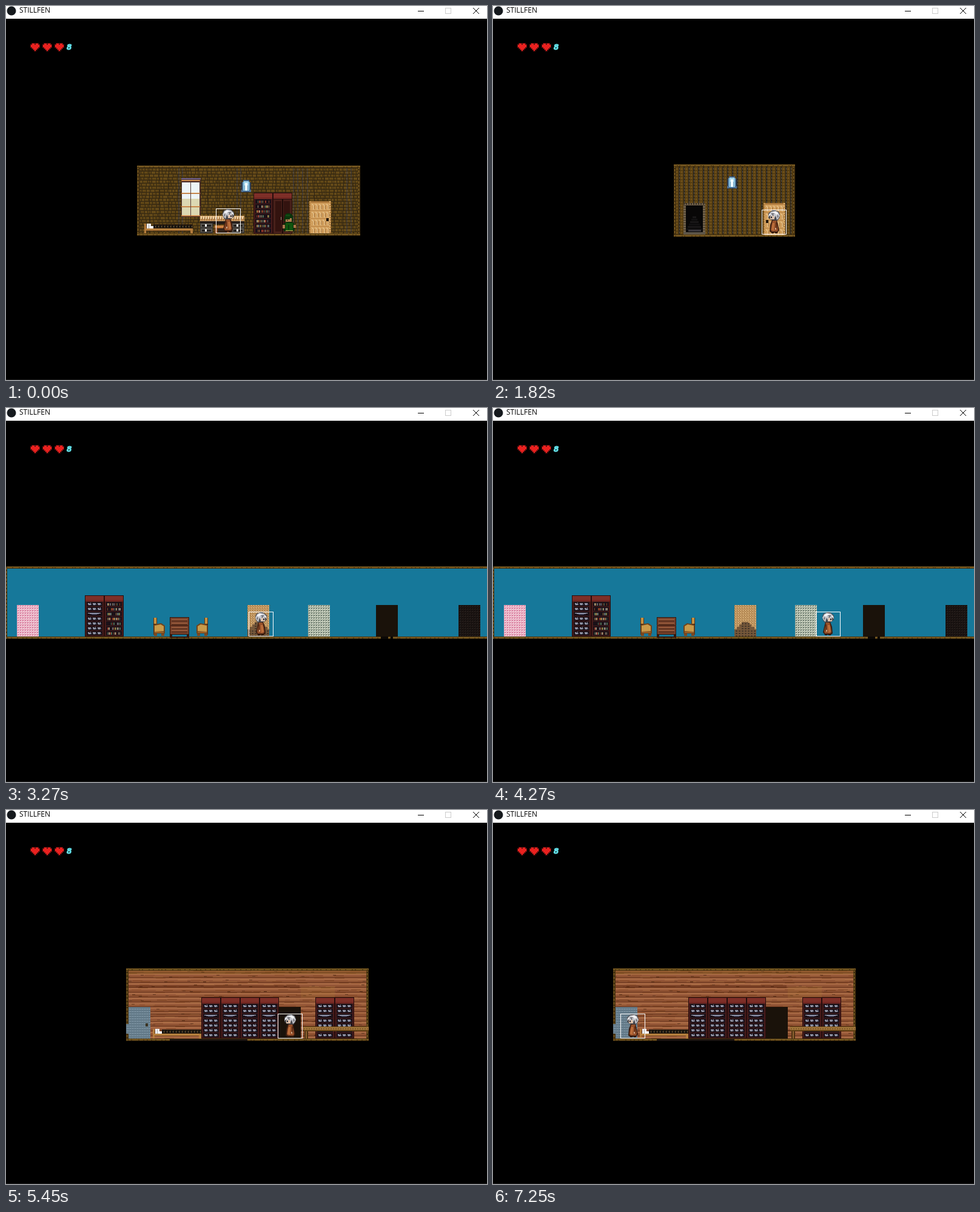
An HTML page with a canvas that plays this animation: 793x617 px, repeating every 8000 ms.

```html
<!DOCTYPE html>
<html lang="en">
<head>
<meta charset="utf-8">
<title>STILLFEN</title>
<style>
html, body { margin: 0; width: 100%; height: 100%; overflow: hidden; background: #000; }
canvas { position: absolute; left: 0; top: 0; }
span { position: absolute; line-height: 16px; white-space: pre; }
#name { left: 22px; top: -1px; font: 12px/16px "Open Sans", sans-serif; color: #000; }
#count { left: 100px; top: 60px; font: italic bold 12px/16px "DejaVu Sans", sans-serif; color: #62dfe8; -webkit-text-stroke: 1px #62dfe8; }
</style>
</head>
<body>
<canvas id="stage" width="793" height="617"></canvas>
<span id="name">STILLFEN</span><span id="count">8</span>
<script>
const W = 793, H = 617, LOOP = 8000;
const view = document.getElementById('stage').getContext('2d');
let g = view, seed = 7;

const rnd = () => (seed = (seed * 16807) % 2147483647) / 2147483647;
const pick = list => list[Math.floor(rnd() * list.length)];
const span = (from, to, step, fn) => { for (let v = from; v < to; v += step) fn(v); };
function box(color, x, y, w, h) { g.fillStyle = color; g.fillRect(x, y, w, h); }
function poly(color, ...p) {
  g.fillStyle = color;
  g.beginPath();
  for (let i = 0; i < p.length; i += 2) g.lineTo(p[i], p[i + 1]);
  g.fill();
}
function clip(x, y, w, h, fn) {
  g.save();
  g.beginPath();
  g.rect(x, y, w, h);
  g.clip();
  fn();
  g.restore();
}
function layer(fn) {
  const c = document.createElement('canvas');
  c.width = W; c.height = H;
  g = c.getContext('2d');
  fn();
  g = view;
  return c;
}

// walls and edges
function beam(x, y, w, h) {
  box('#4a3410', x, y, w, h);
  if (w > h) {
    box('#846528', x, y + 1, w, 1);
    box('#6f511d', x, y + 2, w, 1);
    span(x, x + w, 8, i => box('#3a290e', i + Math.floor(rnd() * 6), y + 2, 2, 1));
  } else {
    box('#846528', x + 1, y, 1, h);
    span(y, y + h, 6, i => box('#3a290e', x + 1, i, 2, 2));
  }
}
function edges(x, y, w, h) {
  beam(x, y, 4, h);
  beam(x + w - 4, y, 4, h);
  beam(x, y, w, 4);
  beam(x, y + h - 4, w, 4);
}
function brickWall(x, y, w, h) {
  clip(x, y, w, h, () => {
    box('#362912', x, y, w, h);
    span(y, y + h, 5, j => {
      let i = x - rnd() * 6;
      while (i < x + w) {
        const n = 5 + Math.floor(rnd() * 4);
        i = Math.floor(i);
        box(pick(['#594113', '#614717', '#533c13']), i, j, n - 1, 4);
        box('#6b4f1b', i, j + 1, n - 2, 1);
        i += n;
      }
    });
    span(x + 4, x + w, 16, i => box('rgba(34,28,22,.5)', i, y, 1, h));
    [284, 290, 380, 386, 473, 480, 488, 496, 561, 568].forEach(i =>
      span(y, y + h, 5, j => box('rgba(66,66,76,.6)', i, j, 2, 4)));
  });
}
function plankWall(x, y, w, h) {
  clip(x, y, w, h, () => {
    box('#5b4113', x, y, w, h);
    span(x, x + w, 8, i => {
      box('#6f501a', i + 4, y, 2, h);
      box('#2a2318', i, y, 2, h);
      span(y, y + h, 5, j => {
        box('#46340f', i + 2, j, 5, 1);
        box('#4c4a48', i + 1, j + 1, 1, 3);
      });
    });
  });
}
function woodWall(x, y, w, h) {
  clip(x, y, w, h, () => {
    box('#98593a', x, y, w, h);
    span(y, y + h, 8, j => {
      box('#a86a44', x, j + 1, w, 2);
      box('#864b2a', x, j + 5, w, 1);
      box('#623118', x, j + 7, w, 1);
      span(x, x + w, 20, i => {
        box(pick(['#7d4424', '#8a4c2a', '#aa6c42']), i + Math.floor(rnd() * 12), j + pick([0, 3, 4, 6]), 16, 1);
        if (rnd() < .4) box('#5f341c', i + Math.floor(rnd() * 14), j + pick([3, 5, 6]), 5, 1);
      });
    });
    box('rgba(80,30,10,.35)', x, 289, 286, 4);
    box('rgba(70,30,12,.3)', 230, 335, 92, 3);
    box('rgba(140,105,35,.3)', x, 265, w, 6);
    box('rgba(166,115,55,.25)', 486, 292, 56, 18);
  });
}

// furniture
function door(x, y, knob) {
  box('#a9763a', x, y, 36, 53);
  box('#d2a05e', x + 2, y + 2, 32, 51);
  span(y + 3, y + 50, 13, j => {
    box('#b98446', x + 2, j - 1, 32, 1);
    span(x + 4, x + 32, 6, i => {
      g.strokeStyle = '#f0d5a4';
      g.beginPath();
      g.moveTo(i, j + 2);
      g.quadraticCurveTo(i + 5, j + 3, i + 3, j + 11);
      g.stroke();
      box('#99652f', i + 4, j + 4, 1, 6);
    });
  });
  span(y, y + 52, 4, j => { box('#c4924f', x, j, 3, 2); box('#e0b878', x + 33, j, 2, 2); });
  box('#21160c', x + knob, y + 28, 4, 5);
}
function lamp(x, y) {
  box('#2b3a52', x, y + 4, 16, 15);
  box('#3f5f84', x + 3, y, 10, 20);
  box('#6ea3c6', x + 2, y + 3, 12, 15);
  box('#a5d6ec', x + 4, y + 2, 8, 16);
  box('#5f93b5', x + 5, y + 9, 1, 9);
  box('#5f93b5', x + 10, y + 9, 1, 9);
  box('#f2fcff', x + 6, y + 5, 4, 12);
  box('#4d6f94', x, y + 16, 3, 4);
  box('#4d6f94', x + 13, y + 16, 3, 4);
}
function bed(x, y) {
  box('#5e3418', x, y + 4, 80, 8);
  box('#30200f', x + 15, y + 1, 65, 7);
  span(x + 15, x + 78, 5, i => {
    box('#171410', i, y + 2, 3, 5);
    box('#71684c', i + 3, y + 4, 1, 2);
  });
  box('#b8823f', x, y + 8, 80, 3);
  box('#7c4d22', x, y + 11, 80, 1);
  box('#b47c3c', x, y, 3, 16);
  box('#b47c3c', x + 76, y + 8, 4, 8);
  box('#f0f0f0', x + 4, y, 7, 8);
  box('#fff', x + 10, y + 4, 5, 4);
  box('#a9a9a9', x + 7, y + 1, 1, 7);
}
function dishes(x, y, r) {
  if (r === 2) {
    box('#a9adc2', x + 1, y + 2, 21, 1);
    box('#70758f', x + 4, y + 3, 15, 1);
    box('#4c5068', x + 7, y + 4, 9, 1);
    return;
  }
  span(x, x + 23, 8, i => {
    const tall = (i - x + r * 8) % 24 === 0;
    box('#555a72', i + 1, y + 3, 6, 2);
    box('#b9bccb', i + 1, y + 2, tall ? 3 : 5, 1);
    box('#d2d3da', i + 2, y + 4, 3, 1);
    if (tall) box('#8f93a6', i + 5, y + 1, 1, 4);
  });
}
function cabinet(x, y, kind) {
  box('#260d0d', x, y, 32, 68);
  box('#7e2f28', x + 1, y + 1, 30, 9);
  box('#6b211d', x + 1, y + 8, 30, 1);
  if (kind === 'plain') {
    box('#48201a', x + 1, y + 11, 30, 56);
    box('#33130f', x + 4, y + 14, 10, 50);
    box('#33130f', x + 18, y + 14, 10, 50);
    box('#1c0a08', x + 15, y + 11, 2, 56);
    box('#8b8478', x + 13, y + 40, 1, 5);
    return;
  }
  box('#471b1a', x + 1, y + 10, 30, 57);
  span(0, 7, 1, r => {
    const j = y + 11 + r * 8;
    box('#1b1118', x + 3, j, 26, 7);
    if (kind === 'dishes') return dishes(x + 4, j, r);
    span(x + 5, x + 27, 2, i => {
      if (rnd() < .78) box(pick(['#8d3527', '#94743a', '#4e6b52', '#66646c', '#7c4428', '#988c74']), i, j + 2, 1 + Math.floor(rnd() * 2), 4);
    });
  });
}
function darkDoor(x, y) { box('#1a120a', x, y, 36, 52); }
function tiles(x, y, base, a, b) {
  box(base, x, y, 36, 52);
  span(y, y + 52, 4, j => span(x, x + 36, 4, i => {
    box(a, i + 1, j + 1, 2, 1);
    box(b, i + 2, j + 2, 2, 1);
  }));
}
function windowPane() {
  box('#4a2f2c', 289, 284, 32, 64);
  box('#6a5d8c', 289, 284, 32, 2);
  box('#edf4f6', 290, 291, 29, 27);
  box('#dcd8b2', 290, 318, 29, 28);
  [287, 308, 330, 345].forEach(y => { box('#b06a34', 289, y, 31, 2); box('#e0a868', 290, y, 29, 1); });
  box('#59403c', 304, 290, 1, 56);
}
function desk() {
  box('#241c18', 320, 355, 73, 5);
  box('#d0a36b', 320, 346, 73, 9);
  span(321, 392, 4, i => { box('#f0d7ae', i, 347, 2, 4); box('#8f6336', i + 2, 349, 1, 5); box('#b9824a', i, 352, 2, 2); });
  [320, 372].forEach(x => {
    box('#373431', x, 358, 21, 17);
    [359, 367].forEach(y => { box('#5c5852', x + 1, y, 19, 6); box('#201d1b', x + 3, y + 2, 15, 3); box('#f2f2f2', x + 8, y + 1, 3, 4); });
  });
  box('#8a4a20', 344, 362, 25, 13);
  box('#cd8142', 344, 362, 25, 4);
  box('#33241a', 349, 367, 15, 8);
}
function chair(x, flip) {
  g.save();
  g.translate(x + (flip ? 22 : 0), 345);
  if (flip) g.scale(-1, 1);
  box('#5b3517', 1, 1, 6, 28);
  box('#c79342', 2, 1, 4, 24);
  box('#3c2210', 1, 11, 5, 2);
  poly('#70441c', 2, 12, 14, 10, 20, 14, 20, 27, 2, 27);
  poly('#c99b4a', 3, 14, 13, 12, 18, 15, 18, 23, 3, 24);
  box('#9a632b', 3, 24, 15, 2);
  box('#7d4820', 2, 27, 5, 4);
  box('#7d4820', 14, 27, 5, 4);
  g.restore();
}
function table() {
  box('#32180f', 270, 345, 32, 34);
  box('#75402a', 271, 346, 30, 27);
  [348, 354, 361, 366].forEach(y => { box('#935739', 273, y, 26, 2); box('#4b2716', 273, y + 3, 26, 1); });
  box('#16789a', 274, 374, 24, 3);
  box('#54291a', 270, 358, 32, 2);
}
function villager() {
  poly('#0a340c', 458, 355, 460, 345, 463, 342, 469, 342, 473, 346, 473, 355);
  box('#114a13', 461, 344, 7, 3);
  box('#b07c50', 461, 350, 10, 7);
  box('#0a340c', 460, 349, 8, 3);
  box('#241a10', 463, 353, 2, 1);
  poly('#08300a', 457, 360, 462, 356, 472, 356, 477, 361, 475, 372, 458, 372);
  box('#10540f', 461, 358, 12, 12);
  box('#0a340c', 465, 361, 2, 8);
  box('#a9754a', 456, 361, 4, 6);
  box('#a9754a', 474, 361, 4, 5);
  box('#b8a850', 461, 370, 12, 1);
  box('#4a3018', 460, 371, 5, 2);
  box('#4a3018', 469, 371, 5, 2);
}

// rooms
function bedroom() {
  brickWall(216, 263, 368, 116);
  edges(216, 263, 368, 116);
  windowPane();
  bed(228, 359);
  desk();
  lamp(388, 287);
  cabinet(408, 308, 'books');
  cabinet(440, 308, 'plain');
  door(500, 322, 28);
}
function hall() {
  plankWall(298, 261, 200, 120);
  edges(298, 261, 200, 120);
  lamp(386, 281);
  box('#6f604a', 314, 325, 36, 52);
  span(325, 377, 4, y => { box('#3b3124', 314, y, 4, 1); box('#3b3124', 346, y, 4, 1); });
  span(314, 350, 4, x => box('#3b3124', x, 325, 2, 3));
  box('#080707', 318, 329, 28, 47);
  span(0, 6, 1, i => {
    const half = Math.min(13, 3 + i * 2);
    box(i & 1 ? '#121112' : '#191718', 332 - half, 347 + i * 4, half * 2, 3);
  });
  box('#3b383d', 322, 369, 21, 3);
  box('#5a5347', 314, 373, 36, 3);
  door(446, 325, 4);
}
function lounge() {
  box('#16789a', 0, 261, W, 120);
  beam(0, 261, W, 4);
  beam(0, 377, W, 4);
  beam(-1, 261, 3, 120);
  tiles(18, 325, '#eab4c6', '#c94f7c', '#fbe3ea');
  cabinet(130, 309, 'dishes');
  cabinet(162, 309, 'books');
  chair(242, false);
  table();
  chair(312, true);
  box('#c49a64', 398, 325, 36, 52);
  span(325, 377, 4, y => span(398, 434, 4, x => {
    box('#a77c48', x, y, 1, 2);
    box('#a77c48', x + 1, y + 2, 2, 1);
    box('#d8b27c', x + 2, y, 1, 2);
  }));
  span(0, 4, 1, i => {
    const x = Math.max(398, 410 - i * 4), w = Math.min(434, 421 + i * 5) - x, y = 353 + i * 4;
    box('#76583a', x, y, w, 377 - y);
  });
  span(355, 377, 4, y => span(400, 432, 5, x => { if (y > 363 || (x > 407 && x < 423)) box('#49392b', x, y, 3, 2); }));
  span(325, 368, 4, y => box('rgba(80,90,80,.6)', 435 + (y & 2), y, 1, 2));
  tiles(498, 325, '#aeb8a6', '#35473f', '#eef0e2');
  darkDoor(610, 325);
  box('#0b0805', 618, 377, 12, 4);
  box('#0b0805', 634, 377, 4, 4);
  tiles(746, 325, '#1b1412', '#0c0909', '#2d2522');
}
function cellar() {
  woodWall(198, 261, 400, 120);
  edges(198, 261, 400, 120);
  box('#6b8291', 198, 325, 40, 52);
  span(326, 377, 4, y => {
    box('#5b7280', 198, y, 40, 1);
    span(200, 238, 4, x => box('#7f95a3', x, y + 2, 2, 1));
  });
  beam(198, 325, 4, 28);
  beam(198, 369, 4, 12);
  box('#3a3322', 230, 352, 4, 5);
  bed(242, 361);
  span(322, 450, 32, x => cabinet(x, 309, 'dishes'));
  darkDoor(450, 325);
  [510, 542].forEach(x => cabinet(x, 309, 'dishes'));
  box('#5f4015', 490, 357, 108, 8);
  box('#a0743a', 490, 358, 108, 5);
  span(491, 597, 4, x => box('#7d5826', x, 360, 2, 2));
  box('#4c3114', 492, 365, 6, 12);
  box('#8f6430', 494, 365, 2, 12);
  box('#1a1310', 270, 378, 128, 3);
}
function heart(x, y) {
  const rows = ['.##.##.', '#######', '#######', '.#####.', '..###..', '...#...'];
  const cells = (color, grow) => rows.forEach((row, j) => [...row].forEach((c, i) => {
    if (c === '#') box(color, x + i * 2 - grow, y + j * 2 - grow, 2 + grow * 2, 2 + grow * 2);
  }));
  cells('#5c0f0e', 1);
  cells('#e9211f', 0);
}
function chrome() {
  box('#fff', 0, 0, W, 21);
  g.fillStyle = '#15191d';
  g.beginPath();
  g.arc(9, 8, 7.5, 0, 7);
  g.fill();
  box('#000', 679, 8, 10, 1);
  g.strokeStyle = '#ccc';
  g.strokeRect(724.5, 3.5, 9, 9);
  g.strokeStyle = '#000';
  g.beginPath();
  g.moveTo(770, 3); g.lineTo(780, 13);
  g.moveTo(780, 3); g.lineTo(770, 13);
  g.stroke();
  [41, 61, 81].forEach(x => heart(x, 62));
  box('#1c1c1c', 0, 616, W, 1);
}

// hero, drawn facing right inside a 41px box
function hero(x, y, face, step) {
  const swing = [0, 2, 0, -2][step], low = step & 1;
  g.save();
  g.translate(x + (face < 0 ? 41 : 0), y);
  g.scale(face, 1);
  box('#2c1a12', 15 + swing, 36, 4, 3);
  box('#2c1a12', 21 - swing, 36, 4, 3);
  g.translate(0, low);
  poly('#3b1d10', 16, 17, 24, 17, 27, 25, 28, 36, 25, 38, 15, 38, 12, 34, 14, 25);
  poly('#96502a', 17, 18, 23, 18, 25, 26, 26, 34, 24, 36, 15, 36, 14, 33, 15, 27);
  poly('#bd6f3c', 20, 22, 23, 22, 25, 33, 21, 35);
  box('#5c2e17', 16, 21, 2, 11 + swing);
  box('#d0a583', 17 + swing, 30, 2, 3);
  poly('#46474d', 11, 8, 13, 3, 17, 2, 20, 0, 25, 2, 30, 6, 30, 13, 26, 17, 15, 18, 12, 14);
  box('#dcc0aa', 20, 10, 7, 6);
  box('#262a34', 24, 11, 2, 3);
  poly('#c6c7cc', 11, 10, 14, 4, 18, 2, 25, 3, 29, 7, 30, 12, 27, 9, 25, 12, 22, 8, 20, 14, 18, 10, 16, 17, 13, 14);
  poly('#f4f4f6', 14, 6, 18, 3, 24, 4, 19, 6, 15, 11);
  poly('#6d6e76', 13, 11, 16, 7, 15, 14);
  poly('#6d6e76', 20, 6, 26, 6, 23, 9);
  poly('#f4f4f6', 25, 6, 29, 8, 29, 11);
  g.restore();
}

// keys: [time, x]; between two keys the hero advances in short steps
const scenes = [
  { at: 0, draw: bedroom, top: 334, x: 346, face: 1, front: villager, keys: [[290, 349], [1160, 464], [1450, 502]] },
  { at: 1510, draw: hall, top: 336, x: 446, face: -1, keys: [[1820, 443], [2380, 370], [2955, 295]] },
  { at: 2980, draw: lounge, top: 336, x: 398, face: 1, keys: [[3270, 400], [4270, 532], [4880, 612], [4940, 612], [4970, 616]] },
  { at: 5040, draw: cellar, top: 336, x: 450, face: -1, keys: [[5450, 448], [6250, 340], [7070, 232], [7250, 210]] }
];
scenes.forEach(s => { s.art = layer(s.draw); });
const frameArt = layer(chrome);

function place(s, t) {
  let x = s.x;
  s.keys.forEach(([a, from], i) => {
    if (t < a) return;
    const next = s.keys[i + 1];
    x = from;
    if (!next) return;
    const n = Math.max(1, Math.round((next[0] - a) / 24.8));
    const k = Math.min(n, Math.floor((t - a) / (next[0] - a) * n + 1e-6));
    x = Math.round(from + (next[1] - from) * k / n);
  });
  return x;
}

function paint(t) {
  const s = scenes.filter(v => v.at <= t).pop();
  const x = place(s, t), first = s.keys[0][0], last = s.keys[s.keys.length - 1][0];
  const moving = t >= first && t < last;
  box('#000', 0, 0, W, H);
  g.drawImage(s.art, 0, 0);
  hero(x, s.top, s.face, moving ? Math.floor((t - first) / 125) % 4 : 0);
  g.strokeStyle = '#fff';
  g.strokeRect(x + .5, s.top + .5, 40, 40);
  if (s.front) s.front();
  g.drawImage(frameArt, 0, 0);
}

const start = performance.now();
function tick() {
  paint((performance.now() - start) % LOOP);
  requestAnimationFrame(tick);
}
tick();
</script>
</body>
</html>
```
